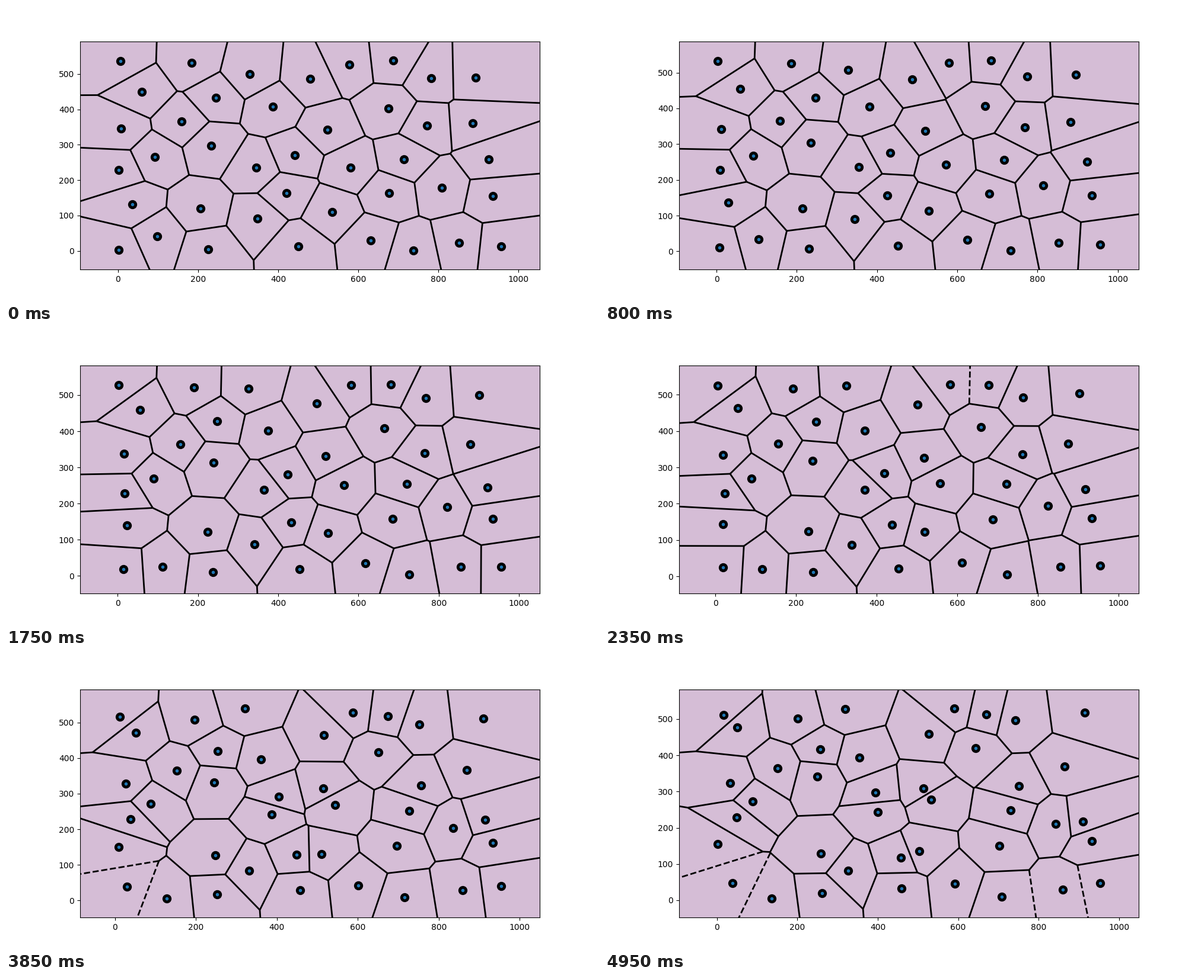
Animation of 1000 by 500 pixels, one loop 5 s. Source, as a matplotlib script:

```python
import matplotlib.pyplot as plt
import numpy as np
from matplotlib.animation import FuncAnimation
from matplotlib.collections import LineCollection

FRAMES, INTERVAL = 100, 50
TOP = 540  # upper wall; the other walls in reach are x = 0 and y = 0

START = np.array([
    (6, 536), (184, 531), (329, 499), (480, 486), (577, 527), (687, 538), (781, 488),
    (892, 490), (60, 450), (244, 433), (386, 407), (675, 403), (7, 345), (159, 365),
    (522, 343), (772, 354), (886, 361), (92, 266), (233, 297), (441, 271), (345, 235),
    (580, 236), (714, 258), (926, 258), (1, 228), (809, 179), (35, 132), (206, 119),
    (420, 164), (534, 110), (676, 163), (936, 155), (1, 3), (98, 41), (225, 5),
    (348, 91), (450, 12), (631, 29), (737, -1), (851, 23), (957, 13)])

# How far each site travels in one loop.
DRIFT = np.array([
    (-23, -25), (17, -30), (-10, 53), (47, -27), (13, 2), (-17, -25), (-38, 9),
    (23, 28), (-10, 27), (13, -16), (-32, -13), (-32, 17), (25, -22), (-8, -1),
    (-9, -35), (-21, -39), (-21, 8), (-4, 7), (16, 44), (-47, 26), (55, 8),
    (-47, 42), (17, -9), (-15, -40), (48, 1), (34, 32), (-34, 23), (53, 10),
    (37, -46), (-30, 25), (26, -13), (-4, 9), (37, 45), (38, -46), (36, 15),
    (-22, -10), (9, 21), (-39, 17), (-28, -9), (10, 7), (-3, 34)])

first, second = np.triu_indices(len(START), 1)
ids = np.arange(len(START))
others = (ids != first[:, None]) & (ids != second[:, None])


def sites_at(frame):
    """Steady drift, reflected at the walls."""
    sites = np.abs(START + DRIFT * frame / (FRAMES - 1))
    sites[:, 1] = TOP - np.abs(TOP - sites[:, 1])
    return sites


def voronoi_edges(sites, reach):
    """Cut the bisector of each pair by all other sites; return closed and open edges."""
    a, b = sites[first], sites[second]
    mid = (a + b) / 2
    along = np.column_stack([a[:, 1] - b[:, 1], b[:, 0] - a[:, 0]])
    along /= np.linalg.norm(along, axis=1)[:, None]

    offset = sites[None] - a[:, None]
    slope = 2 * np.einsum("pkc,pc->pk", offset, along)
    norms = (sites**2).sum(axis=1)
    room = norms - norms[first][:, None] - 2 * np.einsum("pkc,pc->pk", offset, mid)
    with np.errstate(divide="ignore", invalid="ignore"):
        cut = room / slope
    high = np.where(others & (slope > 0), cut, np.inf).min(axis=1)
    low = np.where(others & (slope < 0), cut, -np.inf).max(axis=1)

    closed, opened = [], []
    for m, d, lo, hi in zip(mid, along, low, high):
        if lo >= hi:
            continue
        if np.isfinite(lo) and np.isfinite(hi):
            lo, hi = np.clip([lo, hi], -1e4, 1e4)
            closed.append([m + lo * d, m + hi * d])
        elif np.isfinite(lo):
            opened.append([m + lo * d, m + (lo + reach) * d])
        else:
            opened.append([m + hi * d, m + (hi - reach) * d])
    return closed, opened


def add_lines(style):
    lines = LineCollection([], colors="black", linewidths=2, linestyles=style)
    return ax.add_collection(lines, autolim=False)


fig, ax = plt.subplots(figsize=(10, 5), dpi=100)
ax.set_facecolor("#d5bdd6")
solid, dashed = add_lines("solid"), add_lines("dashed")
rings, = ax.plot([], [], "ko", markersize=10)
dots, = ax.plot([], [], ".", color="C0")


def update(frame):
    sites = sites_at(frame)
    low, high = sites.min(axis=0), sites.max(axis=0)
    span = high - low
    closed, opened = voronoi_edges(sites, span.max())
    solid.set_segments(closed)
    dashed.set_segments(opened)
    rings.set_data(*sites.T)
    dots.set_data(*sites.T)
    (left, bottom), (right, top) = low - 0.1 * span, high + 0.1 * span
    ax.set_xlim(left, right)
    ax.set_ylim(bottom, top)
    return solid, dashed, rings, dots


anim = FuncAnimation(fig, update, frames=FRAMES, interval=INTERVAL, repeat=True)
plt.show()
```
